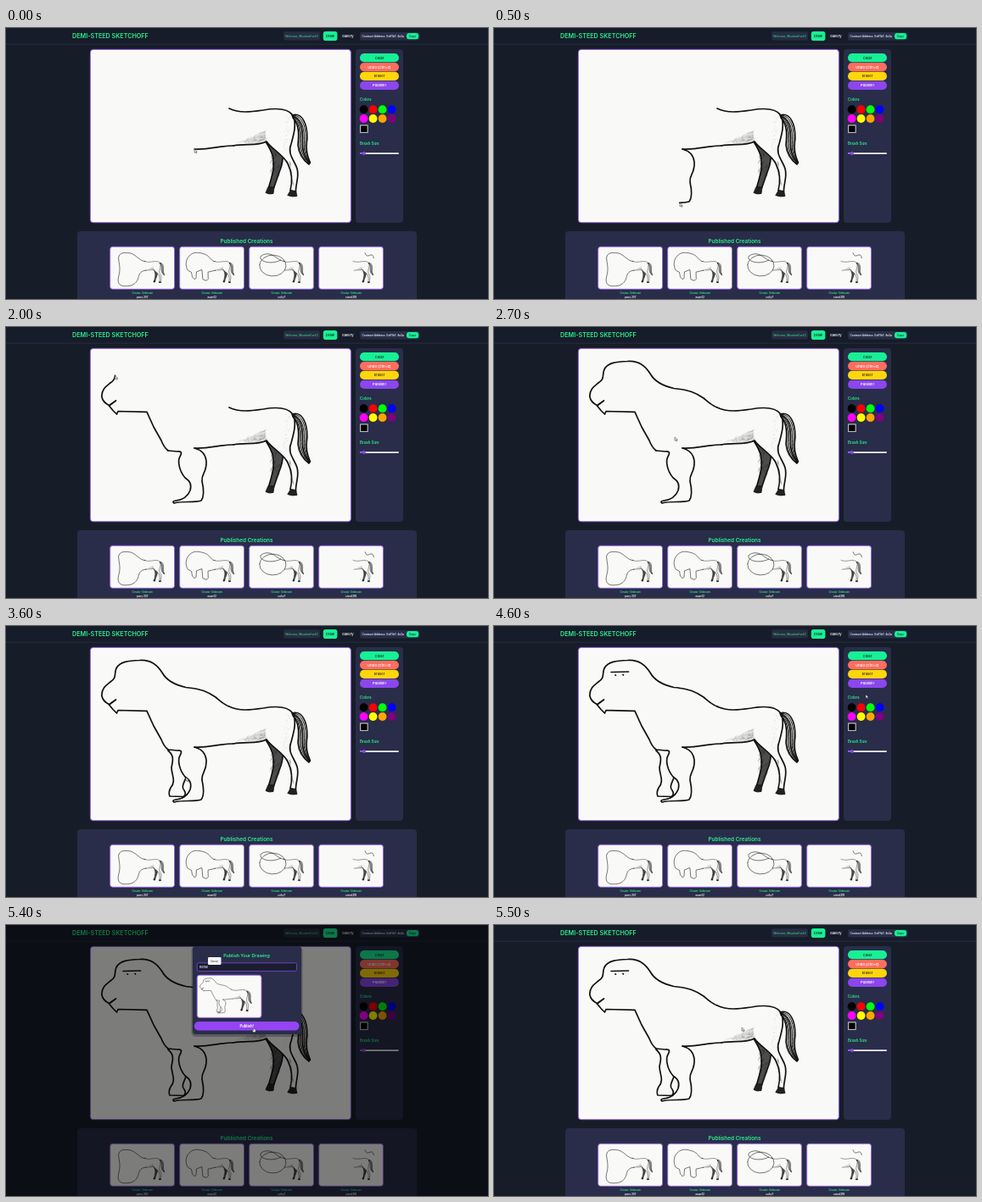
Recreate the animation shown at these times as an HTML page. Size 568 px wide and 320 px high, loop 5.6 s.

```html
<!DOCTYPE html>
<html lang="en">
<head>
<meta charset="utf-8">
<title>Half-drawn sketch game</title>
<style>
  html, body { margin: 0; width: 100%; height: 100%; overflow: hidden; background: #171d28; }
  svg { display: block; width: 100vw; height: 100vh; }
  text { font-family: Inter, "Open Sans", sans-serif; font-weight: 600; }
  .ink { fill: none; stroke: #111; stroke-width: 1.7; stroke-linecap: round; stroke-linejoin: round; }
  .fine { fill: none; stroke: #222; stroke-width: .45; }
  .mini .ink { stroke-width: 2.3; }
  .green { fill: #2cf08f; }
  .panel { fill: #292d49; }
  .card { fill: #f9faf8; stroke: #9a62ee; stroke-width: .9; }
</style>
</head>
<body>
<svg viewBox="0 0 568 320" preserveAspectRatio="none">
  <defs>
    <g id="horse">
      <path fill="#777" opacity=".16" d="M276 134C290 132 296 122 305 122L307 134Q294 139 276 134Z"/>
      <path fill="#4c4c4c" d="M306.5 135C312 145 316 152 315.5 160C315 171 312 180 309.5 189L315.5 189L319.5 176C322 168 326 162 326 153L316 144Z"/>
      <g id="shade" class="fine"></g>
      <path class="ink" stroke-width="1.5" d="M263 95C275 101 289 99 303 97C320 94 333 96 338 103C343 113 339 126 336 137C331 149 340 156 343 166C346 176 341 184 341.5 194"/>
      <path class="ink" stroke-width="1.2" d="M268 139C282 136 297 140 307 134C313 143 327 150 332 160C338 172 337 184 335 192M306.5 135C314 147 316 153 315 166C314 175 311 182 309.5 189M326 154C326 163 322 169 320 176L315.5 189"/>
      <path fill="#222" stroke="#111" stroke-width=".8" d="M309 187.5L306 194.5Q310 197 315 195.5L316 188ZM335.5 191.5L331.8 197.5Q337 200 343 198.5L341.5 192.5Z"/>
      <g id="tail" class="ink"></g>
    </g>
    <g id="arrow"><path d="M0 0V4.3L1.1 3.3L2 5L2.8 4.6L2 3H3.3Z" fill="#eee" stroke="#333" stroke-width=".5"/></g>
    <g id="hand"><path d="M-.5 0Q0 -.7 .5 0V2L2.2 2.5V4.2L1.5 5.4H-.7L-2 3.2L-.5 3.5Z" fill="#fff" stroke="#222" stroke-width=".4"/></g>
  </defs>

  <rect width="568" height="320" fill="#171d28"/>
  <rect width="568" height="19" fill="#161c29"/>
  <path d="M0 19.2H568" stroke="#2b3147" stroke-width=".8"/>
  <g id="page"></g>

  <rect x="99.4" y="25.4" width="307" height="204.3" rx="3.5" class="card"/>
  <use href="#horse"/>
  <g id="drawing" class="ink"><path d="M222 143C240 144 250 139 268 139"/></g>
  <g id="gallery" class="mini"></g>

  <g id="modal">
    <rect width="568" height="320" opacity=".5"/>
    <rect x="218.5" y="25" width="131" height="107" rx="5" opacity=".25"/>
    <rect x="220" y="25" width="128" height="104" rx="4" class="panel"/>
    <text x="283.5" y="38" font-size="5.3" text-anchor="middle" class="green">Publish Your Drawing</text>
    <rect x="225.2" y="44.8" width="117.3" height="9.6" rx="1.8" fill="#1a1e2e" stroke="#7b42d4" stroke-width=".9"/>
    <text id="entry" x="228" y="51" font-size="3.7" style="font-weight:500"></text>
    <rect x="225.2" y="59.2" width="75.8" height="50.2" rx="3" class="card"/>
    <g class="mini" transform="translate(225.4 59.2) scale(.247) translate(-100 -26)">
      <use href="#horse"/><use href="#drawing"/>
    </g>
    <g id="send">
      <rect x="-59.5" y="-5" width="119" height="10" rx="5" fill="#9444f5"/>
      <text y="1.4" font-size="4" text-anchor="middle" fill="#fff" style="font-weight:700">Publish!</text>
    </g>
    <g id="tip">
      <rect x="238" y="38" width="15.5" height="9" rx="1.2" fill="#f4f4f6"/>
      <text x="245.8" y="43.7" font-size="3.2" text-anchor="middle" fill="#555">horse</text>
    </g>
  </g>
  <use id="cursor" href="#arrow"/>
</svg>

<script>
const STEP = 100, LOOP = 5600, MODAL_IN = 4700, MODAL_OUT = 5500;
const $ = id => document.getElementById(id);
const add = (id, html) => $(id).insertAdjacentHTML('beforeend', html);

const box = (x, y, w, h, r, fill) =>
  `<rect x="${x}" y="${y}" width="${w}" height="${h}" rx="${r}" fill="${fill}"/>`;
const label = (x, y, size, text, fill, anchor = 'middle') =>
  `<text x="${x}" y="${y}" font-size="${size}" fill="${fill}" text-anchor="${anchor}">${text}</text>`;

const GREEN = '#2cf08f', PANEL = '#292d49', MINT = '#17f095', DARK = '#123028';

// Header
add('page',
  label(78, 11.9, 7.2, 'DEMI-STEED SKETCHOFF', GREEN, 'start') +
  box(327, 4.2, 43, 10.4, 2.5, '#262d42') +
  label(348.5, 10.5, 3.15, 'Welcome, MeadowFox42', '#38bd79') +
  box(373.8, 4, 16.6, 11, 2.8, MINT) + label(382, 10.9, 3.9, 'Draw', DARK) +
  label(402.8, 10.8, 4, 'Gallery', '#eef0f4') +
  box(417, 5, 70.5, 9.4, 2.5, '#292e48') +
  label(419.5, 10.8, 3.2, 'Contract Address: 0x91b7..4e2a', '#eef0f4', 'start') +
  box(472, 6, 14.2, 7.2, 3, MINT) + label(479, 10.8, 3.2, 'Copy', DARK));

// Tool panel
add('page', box(412, 25, 56, 205, 4, PANEL));
[['Clear', MINT, DARK], ['Undo (Ctrl+Z)', '#ff6d5e', '#fff'],
 ['Eraser', '#ffd60c', '#4a3b00'], ['Publish!', '#8b46ed', '#fff']].forEach(([text, fill, ink], i) => {
  const y = 30 + i * 10.9;
  add('page', box(417, y, 46, 10.3, 5.1, fill) + label(440, y + 6.6, 4.1, text, ink));
});
add('page', label(417, 86.4, 4.3, 'Colors', GREEN, 'start') + label(417, 138.4, 4.4, 'Brush Size', GREEN, 'start'));
['#000', '#f00', '#0f1', '#00f', '#f0f', '#ff0', '#ffa500', '#800080'].forEach((fill, i) =>
  add('page', `<circle cx="${421.6 + i % 4 * 11}" cy="${96.2 + (i >> 2) * 10.8}" r="4.9" fill="${fill}"/>`));
add('page', box(417, 114.3, 9.8, 9.8, .6, '#b8b8bc') + box(418.2, 115.5, 7.4, 7.4, 0, '#000') +
  box(417, 147.2, 46, 1.8, .9, '#f0f0f4') + box(417, 147.2, 5, 1.8, .9, '#8b46ed') +
  '<circle cx="422" cy="148.1" r="2" fill="#8b46ed"/>');

// Published cards
add('page', box(84, 240, 400, 90, 4, PANEL) + label(283.5, 254.2, 6.4, 'Published Creations', GREEN));
const doodles = [
  'M268 96C240 98 222 56 185 55Q143 50 140 78C142 110 152 130 140 170C132 205 150 217 180 214C212 214 230 195 235 172C240 150 250 140 272 139',
  'M268 96C250 100 246 68 215 60C190 53 160 46 139 78C125 99 130 128 140 140L156 148L160 170Q172 188 178 176L180 146L206 136L210 181Q228 194 236 180L235 147L270 139',
  'M268 96C232 92 220 58 182 60Q146 66 155 85C175 108 225 104 250 90M149 112A63 50 0 1 1 275 120A63 50 0 0 1 149 112',
  'M320 56Q326 76 342 67T362 80'];
['pony 207', 'mare12', 'colty7', 'steed318'].forEach((name, i) => {
  const x = 122.7 + i * 82, mid = x + 38;
  add('gallery',
    `<rect x="${x}" y="258.3" width="75.8" height="50" rx="3" class="card"/>
     <g transform="translate(${x} 258.3) scale(.247) translate(-100 -26)">
       <use href="#horse"/><path class="ink" d="${doodles[i]}"/></g>` +
    label(mid, 313.6, 2.8, 'Creator: Unknown', GREEN) +
    label(mid, 319, 3, name, '#fff'));
});

// Horse texture
let seed = 7;
const random = () => (seed = seed * 16807 % 2147483647) / 2147483647;
const hatch = (x, y, dx, dy, opacity) =>
  add('shade', `<path d="M${x} ${y}l${dx} ${dy}" opacity="${opacity}"/>`);
for (let i = 0; i < 80; i++) {
  const u = Math.sqrt(random()), v = random();
  hatch(272 + u * 33, 136 - v * 15 * u, 2.6, -1.4, .15 + .35 * u * (1 - v));
}
for (let i = 0; i < 36; i++) {
  const u = random();
  hatch(335 - random() * 5 - u * 3, 102 + u * 44, -.6, 1.5, .14);
  hatch(313 + random() * 10, 145 + u * 30, -2, 4, .7);
  if (i % 2) hatch(334 + u * 4, 156 + u * 28, 1, 4, .35);
}
const tailOuter = [337, 103, 349, 99, 355, 113, 355, 130, 353, 144, 355, 151, 358.5, 159];
const tailInner = [338, 106, 346, 114, 345, 128, 344, 138, 345, 150, 350, 156, 357, 161];
for (let i = 0; i <= 6; i++) {
  const [x, y, ...curve] = tailOuter.map((v, k) => v + (tailInner[k] - v) * i / 6);
  add('tail', `<path style="stroke-width:${i % 3 ? 1 : 1.6}" d="M${x} ${y}C${curve.join(' ')}"/>`);
}

// Pointer timeline: [start, end, path, leaves ink]
const moves = [
  [0, 1200, 'M222 143C230 145 235 150 236 158C237 172 230 173 231 182C233 191 234 200 230 205C220 208 210 205 198 208Q195 206 200 205C211 204 215 198 217 193C219 186 217 182 211 178C204 170 202 158 205 153Q209 146 202 147L191 146', 1],
  [1200, 1800, 'M191 146Q186 142 183 134L174 118L166 100.3L132 99.5L130.5 103L126 98.5L121.5 93', 1],
  [1800, 2500, 'M121.5 93L129.5 87L121.5 92.5Q114 89 112.8 82C113 73 118 70 123 66C131 61 127 57 130 50C134 42 145 41 157 40.5C171 39 179 47 184 55C190 66 201 70 212 72.5C230 74 238 78 247 84C253 89 257 93 263 95', 1],
  [2500, 2700, 'M263 95L213 130'],
  [2700, 2800, 'M213 130L191 147'],
  [2800, 3600, 'M191 147C198 153 197 158 195 167C195 176 201 183 194 191Q191 197 193 201L209 201.5Q213 199 210 194C206 190 210 185 212 179', 1],
  [3600, 3700, 'M212 179L138 54.5'],
  [3700, 3900, 'M138 54.5L158.5 54', 1],
  [3900, 4000, 'M158.5 54L143 58'],
  [4000, 4100, 'M143 58L143.5 58.2', 1],
  [4100, 4200, 'M152 57.5L152.5 58', 1],
  [4200, 4600, 'M152.5 58C240 50 350 70 438 81'],
  [4600, 4700, 'M438 81L439 70'],
  [4700, 4900, 'M439 70L300 50'],
  [4900, 5200, 'M300 50L270 50'],
  [5200, 5400, 'M270 50L292 121'],
].map(([start, end, d, ink]) => {
  const path = document.createElementNS('http://www.w3.org/2000/svg', 'path');
  path.setAttribute('d', d);
  const length = path.getTotalLength();
  if (ink) $('drawing').append(path);
  return { start, end, path, length, ink };
});

const show = (node, on) => node.setAttribute('visibility', on ? 'visible' : 'hidden');

function render(t) {
  let tip;
  for (const { start, end, path, length, ink } of moves) {
    const p = Math.min(1, Math.max(0, (t - start) / (end - start)));
    if (t >= start) tip = path.getPointAtLength(p * length);
    if (!ink) continue;
    show(path, p > 0);
    path.setAttribute('stroke-dasharray', p < 1 ? `${p * length} ${length + 9}` : 'none');
  }
  const open = t >= MODAL_IN && t < MODAL_OUT;
  $('modal').style.display = open ? '' : 'none';
  const typed = 'horse'.slice(0, Math.max(0, Math.floor((t - 4800) / 80)));
  $('entry').textContent = typed || 'Enter Title';
  $('entry').setAttribute('fill', typed ? '#fff' : '#8b8f9f');
  show($('tip'), open && t >= 5000);
  const hover = t >= 5400;
  $('send').setAttribute('transform', `translate(283.7 119.2) scale(${hover ? 1.04 : 1})`);
  const hand = open && (t < 4800 || hover);
  $('cursor').setAttribute('href', hand ? '#hand' : '#arrow');
  $('cursor').setAttribute('transform', `translate(${tip.x} ${tip.y})`);
}

function tick() {
  render(Math.floor(performance.now() % LOOP / STEP) * STEP);
  requestAnimationFrame(tick);
}
tick();
</script>
</body>
</html>
```
